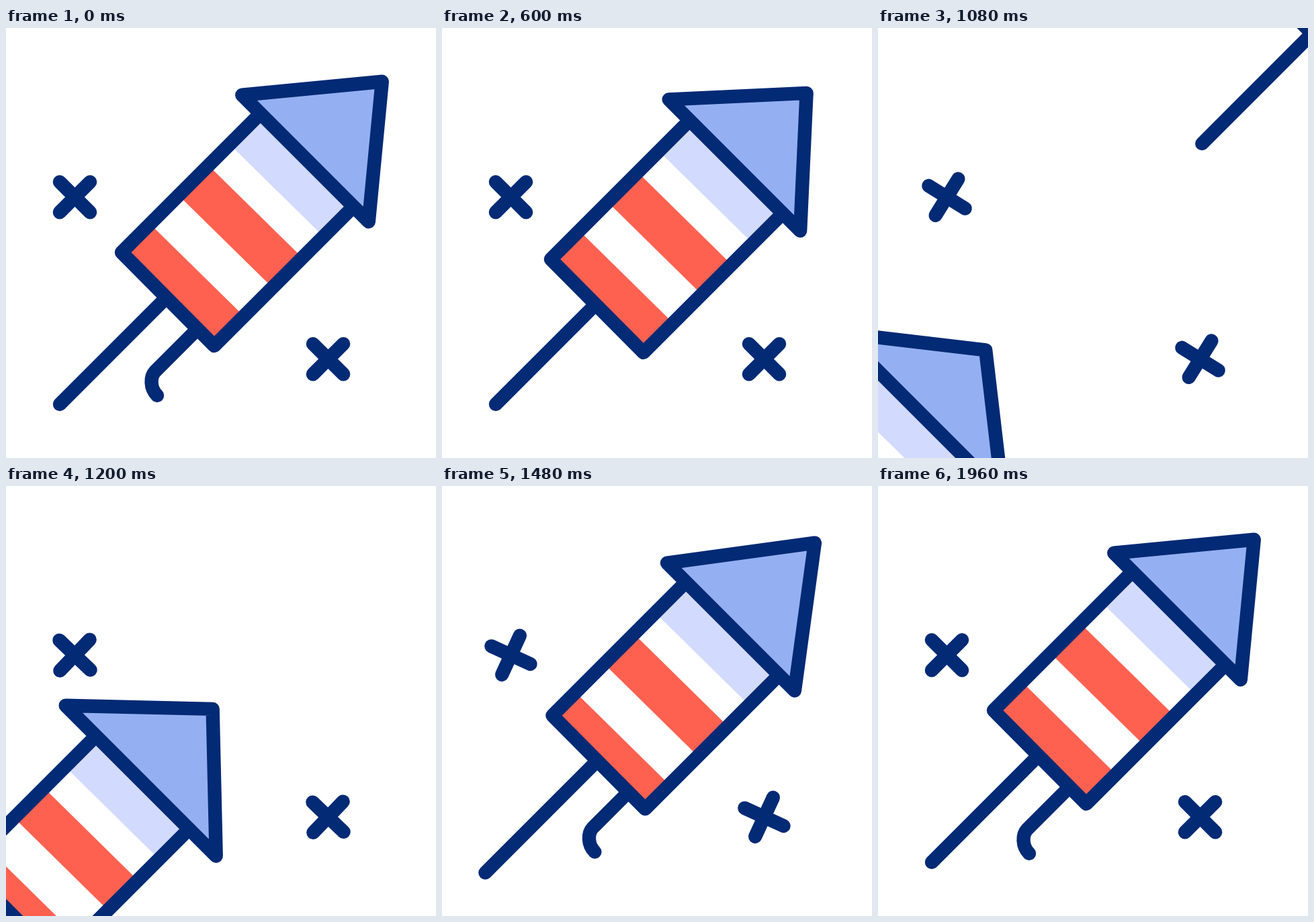
Write an HTML page with a canvas that moves like this. It is 640x640 px and loops after 2 s.

```html
<!DOCTYPE html>
<html lang="en">
<head>
<meta charset="utf-8">
<title>Rocket</title>
<style>
  html, body { margin: 0; width: 100%; height: 100%; overflow: hidden; background: #fff; }
  canvas { display: block; width: 100vw; height: 100vh; }
</style>
</head>
<body>
<canvas id="stage" width="640" height="640"></canvas>
<script>
const LOOP = 2000;
const NAVY = '#032a75', RED = '#ff6150', PALE = '#d2dbfd', BLUE = '#95b0f2';
const ctx = document.getElementById('stage').getContext('2d');

// Smooth curve through [time, value] keys that never overshoots them.
function curve(keys) {
  const slope = keys.slice(1).map((k, i) => (k[1] - keys[i][1]) / (k[0] - keys[i][0]));
  const tangent = keys.map((k, i) => {
    if (i === 0) return slope[0];
    if (i === slope.length) return slope[i - 1];
    const a = slope[i - 1], b = slope[i];
    return a * b <= 0 ? 0 : 2 * a * b / (a + b);
  });
  return t => {
    if (t <= keys[0][0]) return keys[0][1];
    const i = keys.findIndex(k => k[0] >= t) - 1;
    if (i < 0) return keys[keys.length - 1][1];
    const [t0, v0] = keys[i], [t1, v1] = keys[i + 1];
    const d = t1 - t0, p = (t - t0) / d, q = 1 - p;
    return v0 * (1 + 2 * p) * q * q + v1 * p * p * (3 - 2 * p)
      + d * p * q * (tangent[i] * q - tangent[i + 1] * p);
  };
}

const progress = (t, from, to) => Math.min(1, Math.max(0, (t - from) / (to - from)));
const smooth = p => p * p * (3 - 2 * p);
const cubicInOut = p => p < 0.5 ? 4 * p ** 3 : 1 - 4 * (1 - p) ** 3;

// Departing rocket
const leave = {
  shift: t => t < 720
    ? -16 * smooth(progress(t, 430, 720))
    : -16 + 57.5 * ((t - 720) / 120) ** 1.797,
  stick: curve([[720, 16], [840, 22.5], [1080, -5], [1160, -10]]),
  half: curve([[430, 94.25], [600, 97.75], [840, 103.75], [1000, 106]]),
  nose: curve([[430, 114.25], [600, 107.25], [840, 96.75], [1000, 93]])
};

// Arriving rocket
const arrive = {
  shift: curve([[920, -558], [1080, -382], [1320, -125], [1480, -16], [1580, 12], [1720, 2], [1840, 0], [1960, 0]]),
  tail: curve([[1080, 12], [1320, 11], [1480, 8], [1720, 1], [1800, 0]]),
  fuse: curve([[1080, 20], [1320, 19], [1480, 18], [1720, 2], [1840, 0]]),
  half: curve([[1080, 121], [1320, 103.75], [1480, 95], [1600, 94.25]]),
  nose: curve([[1080, 95.5], [1320, 116.75], [1480, 125], [1720, 117], [1900, 114.25]])
};

function trace(points, close) {
  ctx.beginPath();
  points.forEach(([x, y]) => ctx.lineTo(x, y));
  if (close) ctx.closePath();
}

function line(...points) {
  trace(points);
  ctx.stroke();
}

function stripe(color, x0, y0, x1, y1) {
  const a = 8, b = 134, k = 0.984;
  trace([[x0 - a, y0 - a * k], [x0 + b, y0 + b * k], [x1 + b, y1 + b * k], [x1 - a, y1 - a * k]], true);
  ctx.fillStyle = color;
  ctx.fill();
}

function drawFuse(offset, left) {
  const length = 128;
  if (left <= 0) return;
  ctx.save();
  ctx.translate(offset, -offset);
  if (left < 1) ctx.setLineDash([length * left, 2 * length]);
  ctx.beginPath();
  ctx.moveTo(285, 448);
  ctx.lineTo(222, 511);
  ctx.bezierCurveTo(214.5, 519, 214, 536, 225, 547);
  ctx.stroke();
  ctx.restore();
}

// All offsets run along the flight direction, up and to the right.
function drawRocket({ shift, drift = 0, tail = 0, stick = 0, fuse = 0, fuseLeft = 1, half, nose }) {
  ctx.save();
  ctx.translate(shift + drift, drift - shift);

  drawFuse(fuse, fuseLeft);
  line([80 + stick, 560 - stick], [238 + tail, 402 - tail]);

  const body = [[378.5, 127.5], [172 + tail, 334 - tail], [310 + tail, 473 - tail], [517, 266]];
  trace(body, true);
  ctx.fillStyle = '#fff';
  ctx.fill();
  ctx.save();
  ctx.clip();
  stripe(PALE, 390, 130, 340, 180);
  stripe(RED, 308.5, 211.5, 264, 256);
  stripe(RED, 221.5, 298.5, 160, 360);
  ctx.restore();
  line(...body);

  const x = 445.5, y = 194;
  trace([[x - half, y - half], [x + nose, y - nose], [x + half, y + half]], true);
  ctx.fillStyle = BLUE;
  ctx.fill();
  ctx.stroke();
  ctx.restore();
}

function drawCross(x, y, degrees) {
  const r = 22.6;
  ctx.save();
  ctx.translate(x, y);
  ctx.rotate(degrees * Math.PI / 180);
  line([-r, -r], [r, r]);
  line([r, -r], [-r, r]);
  ctx.restore();
}

function draw(t) {
  ctx.fillStyle = '#fff';
  ctx.fillRect(0, 0, 640, 640);
  ctx.strokeStyle = NAVY;
  ctx.lineWidth = 20.4;
  ctx.lineCap = ctx.lineJoin = 'round';

  const turn = 90 * cubicInOut(progress(t, 640, 1300)) - 180 * cubicInOut(progress(t, 1280, 1940));
  drawCross(102.5, 251.7, turn);
  drawCross(479.5, 492.7, turn);

  if (t < 1260) {
    const shift = leave.shift(t);
    drawRocket({
      shift,
      drift: Math.max(0, 0.018 * shift),
      stick: t < 720 ? -shift : leave.stick(t),
      fuseLeft: 1 - progress(t, 40, 520),
      half: leave.half(t),
      nose: leave.nose(t)
    });
  }
  if (t > 920) {
    drawRocket({
      shift: arrive.shift(t),
      tail: arrive.tail(t),
      fuse: arrive.fuse(t),
      half: arrive.half(t),
      nose: arrive.nose(t)
    });
  }
}

const start = performance.now();
function tick() {
  draw((performance.now() - start) % LOOP);
  requestAnimationFrame(tick);
}
tick();
</script>
</body>
</html>
```
